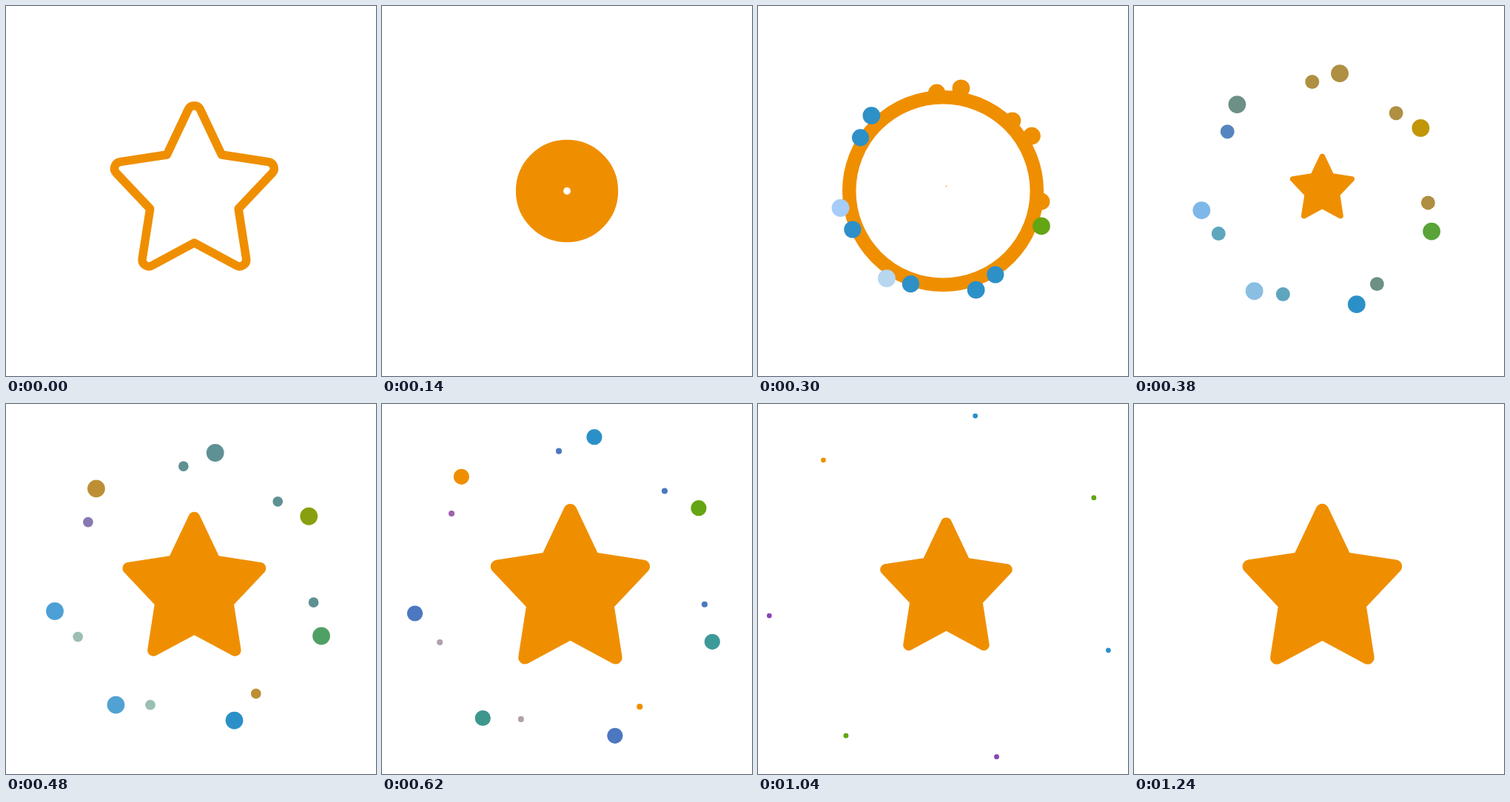
Write an HTML page with a canvas that moves like this. It is 500x500 px and loops after 1.6 s.

```html
<!DOCTYPE html>
<html lang="en">
<head>
<meta charset="utf-8">
<title>Star burst</title>
<style>
  html, body { margin: 0; width: 100%; height: 100%; overflow: hidden; background: #fff; }
  canvas { display: block; }
</style>
</head>
<body>
<canvas width="500" height="500"></canvas>
<script>
const ctx = document.querySelector('canvas').getContext('2d');
const LOOP = 1600, START = 80, END = 1240;
const COLORS = {
  orange: [239, 143, 0], blue: [44, 144, 200], green: [100, 165, 20],
  purple: [142, 68, 180], sky: [166, 204, 248], ice: [184, 214, 240],
  mint: [194, 207, 170], jade: [71, 158, 130], mauve: [168, 111, 173]
};
const ORANGE = rgb(COLORS.orange);

// One spark pair per entry: direction in degrees from the top, then each dot's colours
const SPARKS = [
  [9.8, 'orange blue blue', 'orange blue purple'],
  [58.1, 'orange green green', 'orange blue purple'],
  [109.7, 'green jade blue', 'orange blue purple'],
  [161.7, 'blue blue purple', 'blue orange orange'],
  [212.9, 'ice blue green', 'blue mint purple'],
  [260.6, 'sky blue purple', 'blue mint purple'],
  [316.4, 'blue orange orange', 'blue mauve purple']
];

// Right half of the star relative to its centre; alternating tips and notches
const HALF = [[37, -42.5], [117.2, -30.3], [59.7, 30.5], [73, 115.8]];
const STAR = [[0, -120.8], ...HALF, [0, 76.5], ...HALF.map(([x, y]) => [-x, y]).reverse()];

function rgb(c) { return `rgb(${c.map(Math.round)})`; }

// Linear keyframes: [time, value] pairs
function keys(t, ...stops) {
  if (t <= stops[0][0]) return stops[0][1];
  for (let i = 1; i < stops.length; i++) {
    const [t0, a] = stops[i - 1], [t1, b] = stops[i];
    if (t < t1) return a + (b - a) * (t - t0) / (t1 - t0);
  }
  return stops[stops.length - 1][1];
}

function starPath(scale) {
  ctx.beginPath();
  ctx.moveTo(...STAR[9].map(v => v * scale));
  for (let i = 0; i < 10; i += 2) {
    const [x, y] = STAR[i], [nx, ny] = STAR[i + 1];
    ctx.arcTo(x * scale, y * scale, nx * scale, ny * scale, 9 * scale);
    ctx.lineTo(nx * scale, ny * scale);
  }
  ctx.closePath();
}

function drawStar(t) {
  ctx.save();
  ctx.translate(254.4, 243.5);
  if (t < START) {
    starPath(1);
    ctx.lineWidth = 11.5;
    ctx.lineJoin = 'round';
    ctx.stroke();
  } else if (t > 299) {
    starPath(keys(t, [299, 0], [542, 1.2], [777, 0.6], [END, 1]));
    ctx.fill();
  }
  ctx.restore();
}

function drawRing(t) {
  if (t < START || t >= 316) return;
  const scale = (t - 75) / 237;
  ctx.beginPath();
  ctx.arc(250, 250, 133 * scale, 0, 2 * Math.PI);
  ctx.lineWidth = scale * Math.min(266, 1.32 * (315.7 - t));
  ctx.stroke();
}

function drawDot(t, degrees, distance, radius, names) {
  if (radius <= 0) return;
  const angle = degrees * Math.PI / 180;
  const [a, b, c] = names.split(' ').map(name => COLORS[name]);
  ctx.fillStyle = rgb(a.map((v, i) => keys(t, [300, v], [545, b[i]], [777, c[i]])));
  ctx.beginPath();
  ctx.arc(250.4 + distance * Math.sin(angle), 250 - distance * Math.cos(angle), radius, 0, 2 * Math.PI);
  ctx.fill();
}

function drawSparks(t) {
  if (t < 280 || t >= END) return;
  const drift = 0.0009 * (t - 300);
  const farDistance = keys(t, [280, 135.4], [545, 203.2], [END, 251.8]);
  const farRadius = keys(t, [545, 11.9], [END, 0]);
  const nearDistance = keys(t, [280, 129.3], [545, 178], [820, 209.5]);
  const nearRadius = keys(t, [300, 11.6], [480, 6.9], [780, 0.8], [820, 0]);
  for (const [angle, far, near] of SPARKS) {
    drawDot(t, angle + drift, farDistance, farRadius, far);
    drawDot(t, angle + drift - 13.6, nearDistance, nearRadius, near);
  }
}

function draw(t) {
  ctx.clearRect(0, 0, 500, 500);
  ctx.fillStyle = ctx.strokeStyle = ORANGE;
  drawRing(t);
  drawSparks(t);
  ctx.fillStyle = ORANGE;
  drawStar(t);
}

const began = performance.now();
function tick() {
  draw((performance.now() - began) % LOOP);
  requestAnimationFrame(tick);
}
tick();
</script>
</body>
</html>
```
